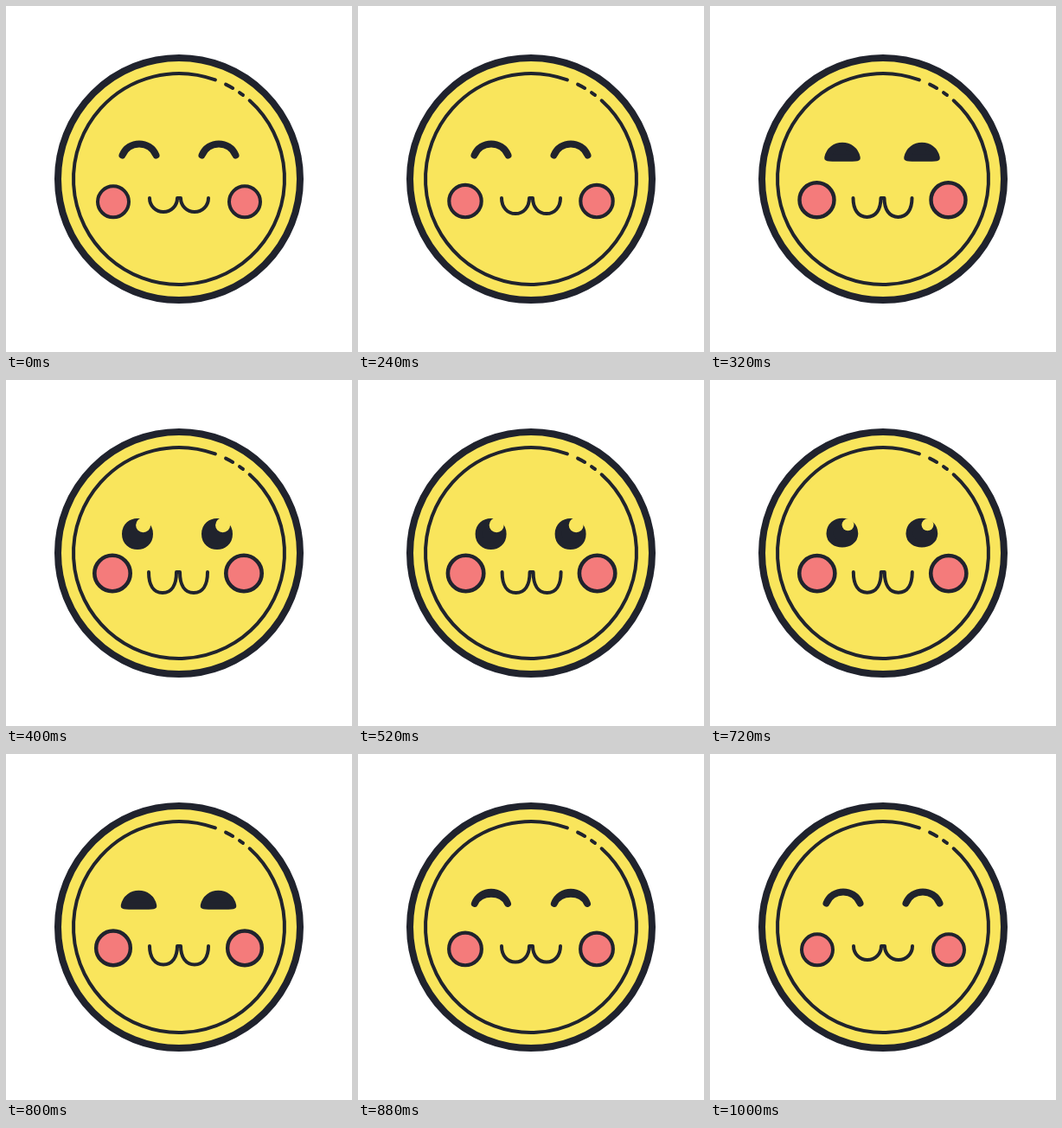
Recreate the animation shown at these times as an HTML page. Size 400 by 400 pixels, loop 1120 ms.

```html
<!DOCTYPE html>
<html lang="en">
<head>
<meta charset="utf-8">
<title>Happy coin</title>
<style>
  html, body { margin: 0; height: 100%; overflow: hidden; background: #fff; }
  svg { display: block; width: 100%; height: 100%; }
</style>
</head>
<body>
<svg viewBox="0 0 400 400" fill="none" stroke="#20232d" stroke-linecap="round" stroke-linejoin="round">
  <circle cx="200" cy="200" r="140" fill="#f9e55c" stroke-width="8"/>
  <circle cx="200" cy="200" r="122" stroke-width="4" pathLength="360"
    stroke-dasharray="338.1 6.2 4.3 4.4 2.3 4.7" transform="rotate(-48 200 200)"/>
  <defs>
    <g id="eye">
      <path id="lid" fill="#20232d" stroke-width="8"/>
      <circle id="shine" fill="#f9e55c" stroke="none"/>
    </g>
    <circle id="cheek" r="18" fill="#f47b7b" stroke-width="4"/>
  </defs>
  <g id="face">
    <use href="#eye"/>
    <use href="#eye" x="92"/>
    <use href="#cheek"/>
    <use href="#cheek" x="152"/>
    <path id="mouth" stroke-width="4"/>
  </g>
</svg>
<script>
const LOOP = 1120, STEP = 40;
const SWAY = [[240, 0], [400, -1], [520, 0.6], [640, -0.4], [800, 0]];
const [face, lid, shine, cheek, mouth] =
  ['face', 'lid', 'shine', 'cheek', 'mouth'].map(id => document.getElementById(id));

const mix = (a, b, k) => a + (b - a) * k;
const clamp = x => Math.min(1, Math.max(0, x));
const ease = (t, from, to) => {
  const x = clamp((t - from) / (to - from));
  return x * x * (3 - 2 * x);
};
const set = (el, attrs) => {
  for (const name in attrs) el.setAttribute(name, attrs[name]);
};

function sway(t) {
  let x = 0;
  for (let i = 1; i < SWAY.length; i++) {
    const [t0, x0] = SWAY[i - 1], [t1, x1] = SWAY[i];
    x += (x1 - x0) * ease(t, t0, t1);
  }
  return x;
}

// Morphs from a thick arc (0) to a full disc (1).
function drawEye(k) {
  const cx = mix(154, 153, k), y = mix(172.5, 178, k), half = mix(19.5, 14, k);
  const inset = mix(7.2, 0, k);
  const l = cx - half, r = cx + half;
  const top = y - mix(17.4, 18.67, k), low = y + mix(-17.4, 18.67, k);
  set(lid, { d: `M${l} ${y}C${l + inset} ${top} ${r - inset} ${top} ${r} ${y}` +
    `C${r - inset} ${low} ${l + inset} ${low} ${l} ${y}Z` });
  set(shine, { cx: cx + 6.6, cy: y - 10.3, r: 8.5 * clamp((k - 0.6) / 0.4) });
}

function drawMouth(k) {
  const depth = mix(16, 24, k), side = mix(9, 15, k), bend = mix(7, 5.5, k);
  const cup = `c0 ${side} ${bend} ${depth} 16 ${depth}s16 ${side - depth} 16 ${-depth}`;
  set(mouth, { d: `M166 222${cup}h4${cup}` });
}

function draw(t) {
  const open = ease(t, 160, 400) - ease(t, 680, 1000);
  drawEye(ease(t, 240, 400) - ease(t, 680, 920));
  drawMouth(open);
  set(cheek, { transform: `translate(124 ${mix(226.3, 223.5, open)}) scale(${mix(1, 1.15, open)})` });
  set(face, { transform: `translate(${sway(t)} 0)` });
}

function tick() {
  const t = performance.now() % LOOP;
  draw(Math.floor(t / STEP) * STEP);
  requestAnimationFrame(tick);
}
tick();
</script>
</body>
</html>
```
